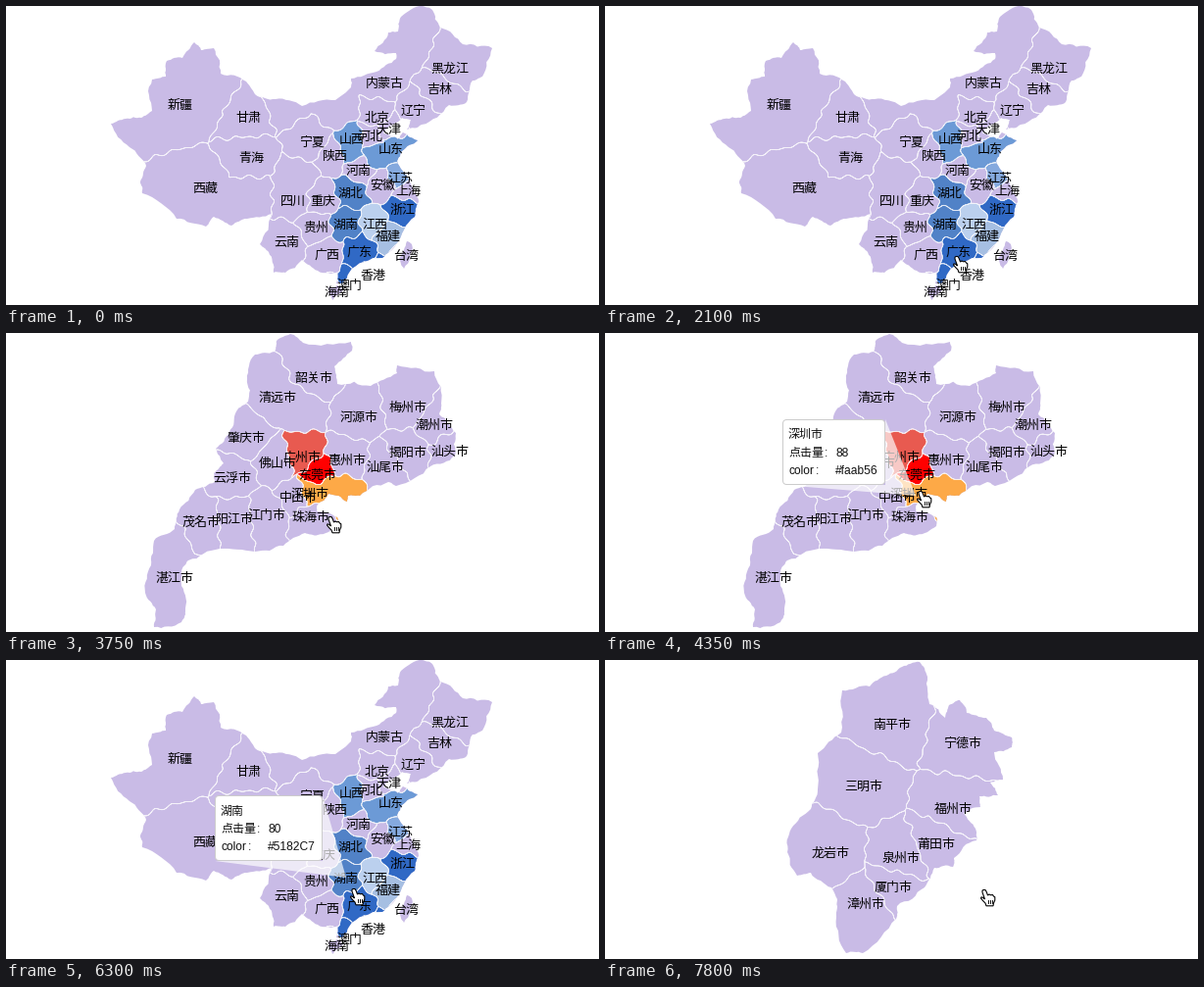
A matplotlib script that plays this animation: 605x305 px, repeating every 8000 ms.

```python
import random

import matplotlib.pyplot as plt
import numpy as np
from matplotlib.animation import FuncAnimation
from matplotlib.patches import FancyBboxPatch, PathPatch, Polygon
from matplotlib.path import Path

W, H, DPI = 605, 305, 100
LOOP, STEP, TICK = 8000, 50, 150
PX = 72 / DPI
LILAC, PALE, SKY, JADE, STEEL, MID, DEEP = (
    "#c9bbe6", "#bbd0ee", "#a6bfe2", "#85a9de", "#6c9ad6", "#5182c7", "#3069c5")
CJK = ["Noto Sans CJK JP"]
MIXED = ["Liberation Sans", "Noto Sans CJK JP"]

fig = plt.figure(figsize=(W / DPI, H / DPI), dpi=DPI, facecolor="white")
ax = fig.add_axes([0, 0, 1, 1])
ax.set_xlim(0, W)
ax.set_ylim(H, 0)
ax.axis("off")

# Slightly wavy coordinates make the borders between regions look hand surveyed.
GX, GY = np.meshgrid(np.arange(100, 504), np.arange(H))
WAVY_X = GX + 1.3 * np.sin(GY / 2.3) + 1.2 * np.sin(GX / 5 + GY / 4)
WAVY_Y = GY + 1.3 * np.sin(GX / 2.6) + 1.2 * np.sin(GX / 4 - GY / 5)


def rough(coords, rng, levels=3, amount=.11):
    """Close a polygon and break its edges by midpoint displacement."""
    pts = np.reshape(coords, (-1, 2)).astype(float)
    for _ in range(levels):
        nxt = np.roll(pts, -1, axis=0)
        normal = (nxt - pts)[:, ::-1] * [-1, 1]
        shift = np.array([rng.uniform(-amount, amount) for _ in pts])
        mid = (pts + nxt) / 2 + normal * shift[:, None]
        pts = np.stack([pts, mid], axis=1).reshape(-1, 2)
    return Path(np.vstack([pts, pts[:1]]), closed=True)


class Map:
    """An outline shared out among its places: each point goes to the nearest seed."""

    def __init__(self, outlines, places, suffix="", colors={}, extra={}):
        rng = random.Random(7)
        land = Path.make_compound_path(*[rough(o, rng) for o in outlines])
        self.land = ax.add_patch(PathPatch(land, fc=LILAC, ec="none", zorder=1))
        self.parts = [self.land]

        reach = np.array([self.distance([spot, *extra.get(name, [])])
                          for name, spot in places.items()])
        borders = []
        for i, name in enumerate(places):
            margin = reach[i] - np.delete(reach, i, axis=0).min(axis=0)
            borders.append(self.trace(ax.contour, margin, [0]))
            if name in colors:
                cell = self.trace(ax.contourf, margin, [-999, 0])
                self.clipped(cell, fc=colors[name], ec="none", zorder=1.5)
        borders = Path.make_compound_path(*[b for b in borders if len(b)])
        self.clipped(borders, fc="none", ec="white", lw=.8 * PX, alpha=.8, zorder=2)

        for name, (x, y) in places.items():
            self.parts.append(ax.text(x, y + 5, name + suffix, ha="center", va="baseline",
                                      family=CJK, size=13 * PX, color="black", zorder=3))

    @staticmethod
    def distance(seeds):
        return np.min([np.hypot(WAVY_X - x, WAVY_Y - y) for x, y in seeds], axis=0)

    @staticmethod
    def trace(draw, field, levels):
        lines = draw(GX, GY, field, levels=levels)
        path = lines.get_paths()[0]
        lines.remove()
        return path

    def clipped(self, path, **style):
        patch = ax.add_patch(PathPatch(path, **style))
        patch.set_clip_path(self.land)
        self.parts.append(patch)

    def show(self, on):
        for part in self.parts:
            part.set_visible(on)


north = [107, 120, 122, 115, 138, 114, 149, 107, 149, 75, 163, 72, 164, 56, 180, 53, 192, 37,
         199, 45, 212, 43, 219, 69, 245, 77, 254, 90, 275, 95, 302, 102, 336, 96, 352, 83,
         352, 74, 378, 67, 398, 54, 398, 48, 376, 46, 390, 27, 400, 26, 403, 11, 425, 0,
         435, 4, 443, 22, 466, 39, 496, 43, 486, 72, 476, 76, 470, 98, 452, 101, 424, 121,
         409, 126, 413, 116, 404, 114, 390, 123, 385, 130]
south = [400, 136, 405, 129, 420, 137, 404, 148, 399, 158, 411, 178, 421, 200, 417, 215,
         398, 243, 384, 257, 350, 272, 343, 283, 337, 283, 339, 271, 318, 270, 302, 259,
         285, 272, 273, 272, 268, 251, 259, 243, 271, 212, 246, 217, 230, 224, 212, 215,
         204, 225, 174, 217, 139, 191, 137, 179, 143, 163, 126, 144]
taiwan = [409, 240, 414, 243, 406, 268, 401, 257]
hainan = [329, 287, 338, 285, 344, 290, 333, 300]
china = Map(
    [north + south, taiwan, hainan],
    dict(新疆=(178, 100), 甘肃=(247, 113), 青海=(250, 154), 西藏=(203, 185), 宁夏=(312, 138),
         陕西=(335, 152), 山西=(353, 135), 河北=(372, 132), 北京=(379, 113), 天津=(390, 125),
         内蒙古=(386, 78), 黑龙江=(453, 63), 吉林=(442, 84), 辽宁=(416, 106), 山东=(393, 145),
         河南=(360, 167), 江苏=(402, 175), 安徽=(384, 182), 上海=(410, 188), 浙江=(404, 207),
         湖北=(352, 190), 湖南=(347, 222), 江西=(376, 222), 福建=(390, 234), 台湾=(408, 254),
         广东=(360, 250), 香港=(375, 274), 澳门=(350, 284), 海南=(337, 291), 广西=(327, 253),
         云南=(286, 240), 贵州=(316, 225), 四川=(293, 198), 重庆=(323, 198)),
    colors=dict(山西=STEEL, 山东=STEEL, 江苏=JADE, 湖北=MID, 湖南=MID, 江西=PALE, 福建=SKY,
                浙江=DEEP, 广东=DEEP, 香港=DEEP, 澳门=DEEP),
    extra=dict(内蒙古=[(285, 98), (340, 108), (406, 42)], 山东=[(379, 150)], 山西=[(350, 147)],
               西藏=[(250, 195)], 新疆=[(205, 90)], 四川=[(298, 178)]))

inland = [276, 8, 290, 1, 303, 10, 352, 9, 353, 18, 335, 34, 338, 52, 372, 54, 399, 41,
          399, 33, 437, 39, 444, 72, 442, 83, 459, 102, 458, 125]
coast = [433, 136, 398, 156, 390, 152, 361, 166, 349, 166, 348, 172, 329, 164, 318, 175,
         317, 182, 338, 188, 338, 197, 318, 206, 305, 204, 283, 217, 254, 223, 218, 220,
         186, 232, 180, 240, 179, 258, 183, 284, 179, 295, 151, 300, 153, 282, 142, 265,
         148, 237, 151, 212, 172, 200, 177, 180, 193, 160, 213, 152, 212, 143, 222, 133,
         214, 118, 228, 101, 235, 80, 247, 70, 246, 47, 254, 22, 274, 19]
guangdong = Map(
    [inland + coast],
    dict(韶关=(314, 45), 清远=(277, 65), 河源=(360, 85), 梅州=(410, 75), 潮州=(437, 93),
         汕头=(453, 120), 揭阳=(410, 121), 汕尾=(387, 136), 惠州=(348, 129), 广州=(302, 126),
         东莞=(318, 144), 深圳=(310, 163), 中山=(298, 167), 佛山=(277, 132), 肇庆=(245, 106),
         云浮=(231, 147), 茂名=(199, 192), 阳江=(233, 189), 江门=(266, 185), 珠海=(311, 187),
         湛江=(172, 249)),
    suffix="市",
    colors=dict(广州="#e85a50", 东莞="#ff0000", 深圳="#fda947"),
    extra=dict(深圳=[(325, 160), (341, 162)], 清远=[(300, 75)], 湛江=[(163, 210)]))

upper = [303, 7, 321, 2, 329, 17, 331, 45, 347, 59, 351, 46, 362, 41, 369, 54, 389, 59,
         397, 72, 415, 79, 415, 89, 397, 94, 406, 122, 393, 125, 401, 138, 382, 139,
         383, 150, 366, 156, 378, 172, 379, 184]
lower = [356, 202, 355, 211, 336, 212, 326, 232, 298, 251, 297, 264, 263, 299, 246, 299,
         236, 262, 237, 245, 231, 232, 210, 217, 196, 220, 186, 196, 190, 172, 210, 152,
         217, 132, 217, 95, 241, 74, 242, 31, 270, 27, 287, 16]
fujian = Map(
    [upper + lower],
    dict(南平=(293, 65), 宁德=(365, 84), 三明=(264, 128), 福州=(355, 151), 莆田=(338, 187),
         泉州=(302, 201), 龙岩=(230, 196), 厦门=(294, 231), 漳州=(266, 248)),
    suffix="市")


class Tooltip:
    """White card with a translucent wedge pointing at its region."""

    def __init__(self, start, stop, x, y, width, tip, name, clicks, color):
        self.start, self.stop = start, stop
        height = 67
        wedge = [(x + width, y), tip, (x, y + height), (x + width, y + height)]
        self.wedge = ax.add_patch(Polygon(wedge, fc="white", ec="none", zorder=5))
        self.parts = [ax.add_patch(FancyBboxPatch(
            (x + 3.5, y + 3.5), width - 7, height - 7, boxstyle="round,pad=3,rounding_size=4",
            fc="white", ec="#cccccc", lw=PX, zorder=6))]
        left, value = x + 6, x + 54
        rows = [[(left, name)],
                [(left, "点击量"), (left + 37, ":"), (value, clicks)],
                [(left, "color"), (left + 28, ":"), (value, color)]]
        for i, row in enumerate(rows):
            for tx, s in row:
                self.parts.append(ax.text(tx, y + 19.5 + 18.4 * i, s, family=MIXED,
                                          size=12 * PX, color="#111111", va="baseline", zorder=7))

    def show(self, t):
        alpha = min((t - self.start) / 250, 1) if self.start < t < self.stop else 0
        self.wedge.set_alpha(.68 * alpha)
        for part in self.parts:
            part.set_alpha(alpha)
        for part in [self.wedge, *self.parts]:
            part.set_visible(alpha > 0)


cards = [
    Tooltip(3750, 5100, 181, 88, 105, (317, 166), "深圳市", "88", "#faab56"),
    Tooltip(5850, 6150, 208, 76, 110, (349, 187), "湖北", "80", "#5182C7"),
    Tooltip(6000, 6600, 213, 138, 110, (347, 222), "湖南", "80", "#5182C7"),
    Tooltip(6900, 7650, 245, 165, 110, (389, 241), "福建", "300", "#A6BFE2"),
]

# ---- pointer ----
HAND = np.reshape([3, .5, 5, .5, 6.2, 2.5, 7.5, 6, 9, 5, 10.5, 5.8, 12.5, 5.5, 13.5, 7,
                   14.8, 7.8, 14.8, 11, 13.5, 14, 13, 16.8, 6, 16.8, 5, 14, 2.5, 11.5,
                   .5, 9, 1, 7.8, 3, 8.5, 4.5, 10, 2, 3, 2, 1.2], (-1, 2))
ARROW = np.reshape([.5, .5, .5, 14.5, 3.8, 11.6, 6, 16.6, 8.2, 15.7, 6, 10.8, 10.4, 10.8], (-1, 2))
pointer = ax.add_patch(Polygon(HAND, closed=True, lw=1.1 * PX, zorder=9))
fingers = [ax.plot([], [], color="black", lw=.9 * PX, zorder=10)[0] for _ in range(3)]

# Stops of the pointer: time, x, y.
STOPS = np.array([(150, 412, 298), (900, 362, 253), (1950, 362, 253), (2100, 355, 255),
                  (3150, 355, 255), (3900, 320, 170), (4350, 318, 161), (5700, 318, 161),
                  (6300, 351, 233), (6750, 356, 248), (7200, 383, 234)]).T


def draw_pointer(t):
    at = np.array([np.interp(t, STOPS[0], axis) for axis in STOPS[1:]]).round()
    arrow = t < 2100 or 3300 <= t < 3750
    pointer.set_visible(t >= 150)
    pointer.set_xy((ARROW if arrow else HAND) + at)
    pointer.set_facecolor("black" if arrow else "white")
    pointer.set_edgecolor("white" if arrow else "black")
    for i, line in enumerate(fingers):
        x = at[0] + 7.5 + 2 * i
        line.set_data([x, x], [at[1] + 10.5, at[1] + 14])
        line.set_visible(not arrow)


def update(frame):
    t = frame * STEP // TICK * TICK
    in_guangdong, in_fujian = 2550 <= t < 5100, t >= 7650
    guangdong.show(in_guangdong)
    fujian.show(in_fujian)
    china.show(not (in_guangdong or in_fujian))
    for card in cards:
        card.show(t)
    draw_pointer(t)
    return []


anim = FuncAnimation(fig, update, frames=LOOP // STEP, interval=STEP,
                     repeat=True, repeat_delay=0, blit=False)
plt.show()
```
